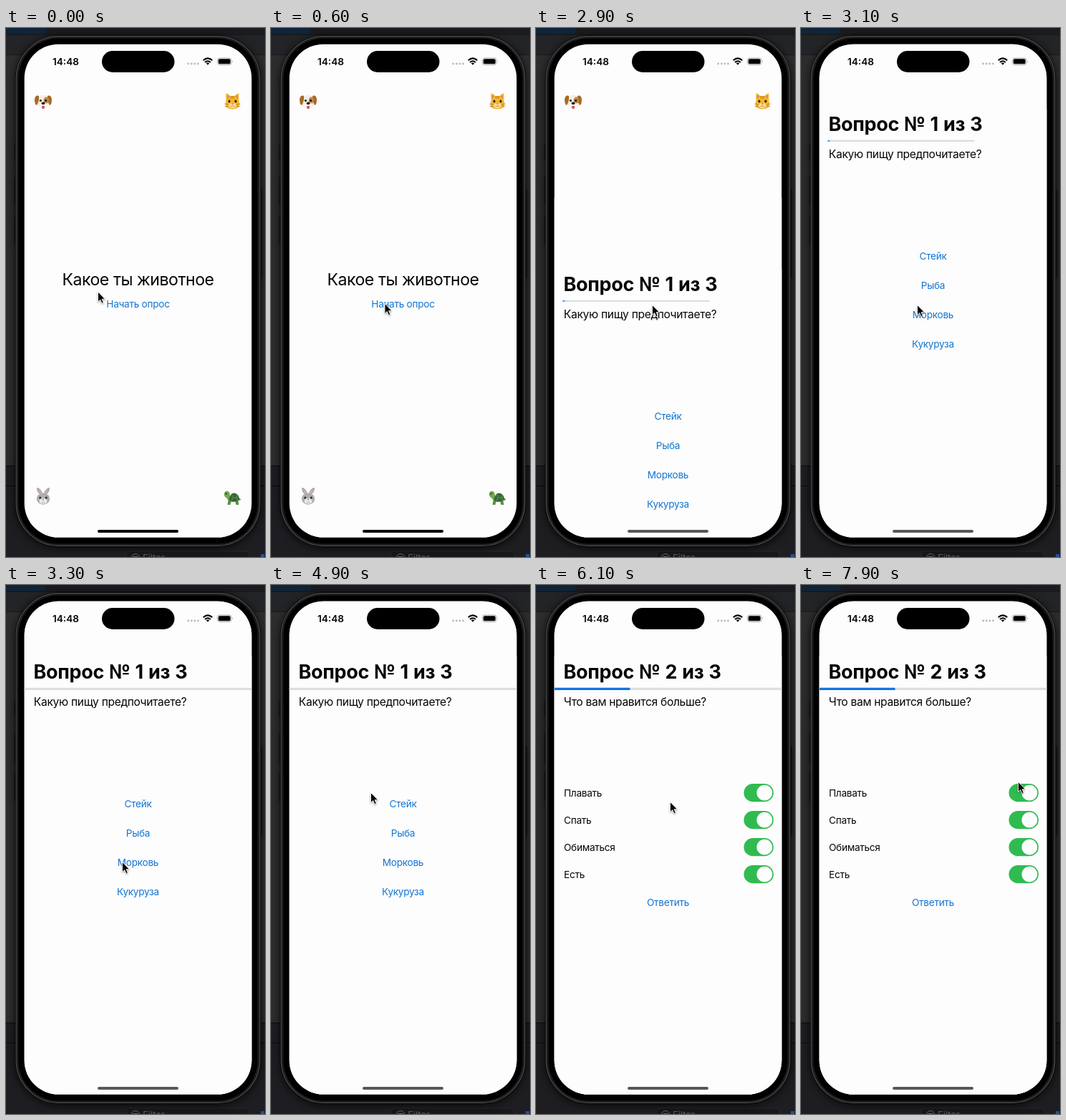
Write an HTML page that moves like this. It is 362 px wide and 740 px high and loops after 8 s.

```html
<!DOCTYPE html>
<html lang="ru">
<head>
<meta charset="utf-8">
<style>
html, body { margin: 0; width: 100%; height: 100%; overflow: hidden; background: #1e1e22; }
svg { display: block; width: 362px; height: 740px; }
text { font: 13.6px Inter, sans-serif; font-optical-sizing: none; letter-spacing: -.02em; fill: #050505; }
.mid { text-anchor: middle; }
.hero { font-size: 23.1px; }
.title { font-size: 27px; font-weight: 700; letter-spacing: -.012em; word-spacing: 1px; }
.sub { font-size: 15.6px; }
.link { fill: #1275d2; }
.time { font-weight: 600; letter-spacing: 0; }
.phone { filter: drop-shadow(0 2px 6px #000b); }
.cursor { filter: drop-shadow(0 1px 1px #0006); }
</style>
</head>
<body>
<svg viewBox="0 0 362 740">
  <defs>
    <clipPath id="screen"><rect x="25.7" y="22.7" width="317.6" height="689.8" rx="47.5"/></clipPath>
  </defs>

  <!-- desktop -->
  <rect width="362" height="740" fill="#2d2d2e"/>
  <rect width="362" height="38" fill="#232427"/>
  <rect width="362" height="9" fill="#1b1c1f"/>
  <rect width="55" height="8" fill="#10253a"/>
  <path d="M0 9.5H362M0 37.5H362" stroke="#18191b"/>
  <rect y="612" width="362" height="128" fill="#1e1e22"/>
  <path d="M0 612.5H362M0 640.5H362" stroke="#0b0b0d"/>
  <rect x="168" y="732" width="172" height="20" rx="5" fill="#18181b" stroke="#28292c"/>
  <g fill="none" stroke="#68696c"><circle cx="181" cy="741" r="5.5"/><path d="M178 739.5H184"/></g>
  <text x="191" y="746" style="fill:#58595c">Filter</text>
  <rect x="356" y="736" width="5" height="4" fill="#2450a0"/>

  <!-- handset -->
  <g class="phone">
    <path d="M13 163V184M13 208V248M13 262V302M356.5 226V350" stroke="#101010" stroke-width="3"/>
    <rect x="12.8" y="10.3" width="343.4" height="715.4" rx="61" fill="#000"/>
  </g>
  <rect x="14.2" y="11.7" width="340.6" height="712.6" rx="59.5" fill="#1c1c1d" stroke="#4c4d4f" stroke-width="1.2"/>
  <rect x="17.3" y="14.500" width="334.4" height="707" rx="56.500" fill="#000"/>
  <rect x="25.7" y="22.7" width="317.6" height="689.8" rx="47.5" fill="#fdfdfd"/>

  <g clip-path="url(#screen)">
    <g id="home">
      <text class="mid hero" x="184.5" y="360">Какое ты животное</text>
      <text class="mid link" id="start" x="184.5" y="390.600">Начать опрос</text>

      <g transform="translate(52 103)">
        <ellipse rx="9.2" ry="9.3" fill="#f3eee6"/>
        <path d="M-6-8Q-11-10-12-3Q-12 4-9 5Q-7 2-6-3ZM6-8Q11-10 12-3Q12 4 9 5Q7 2 6-3Z" fill="#a86a28"/>
        <ellipse cx="4.3" cy="-2" rx="3.6" ry="4.6" fill="#c38945"/>
        <ellipse cy="5" rx="5.5" ry="4" fill="#fffaf3"/>
        <circle cx="-3.6" cy="-1.5" r="1.6" fill="#241810"/><circle cx="3.6" cy="-1.5" r="1.6" fill="#241810"/>
        <ellipse cy="2.4" rx="2.5" ry="1.8" fill="#1d1715"/>
        <path d="M-2 6H2V9Q0 11.5-2 9Z" fill="#d85b62"/>
      </g>

      <g transform="translate(316.5 103)">
        <path d="M-9-1L-9-11Q-8-13-3-8H3Q8-13 9-11L9-1Q13 10 0 10.5Q-13 10-9-1Z" fill="#f4b62f"/>
        <path d="M-7.5-4V-9.5L-4-7ZM7.5-4V-9.5L4-7Z" fill="#d98b58"/>
        <path d="M-2-8V-4M2-8V-4M0-8V-4" stroke="#c77d19"/>
        <ellipse cy="5.5" rx="5" ry="3.5" fill="#fbe3a1"/>
        <ellipse cx="-4.5" cy="-.5" rx="1.5" ry="1.9" fill="#2d2411"/><ellipse cx="4.5" cy="-.5" rx="1.5" ry="1.9" fill="#2d2411"/>
        <path d="M-1.6 2.5H1.6L0 4.5Z" fill="#b65b48"/>
        <path d="M-3 6Q-1 8 0 5.5Q1 8 3 6M-6 4L-11 3M-6 6L-11 7M6 4L11 3M6 6L11 7" fill="none" stroke="#9a6c25" stroke-width=".7"/>
      </g>

      <g transform="translate(52 655)">
        <path d="M-2-2Q-9-4-9-12Q-4-12-1-4H1Q4-12 9-12Q9-4 2-2Z" fill="#a3a3a8"/>
        <path d="M-4-4Q-7-7-7-10Q-4-8-2-4ZM4-4Q7-7 7-10Q4-8 2-4Z" fill="#d9b2b6"/>
        <ellipse cy="3.5" rx="9.2" ry="8" fill="#adadb1"/>
        <ellipse cy="7" rx="5.5" ry="4" fill="#ececee"/>
        <circle cx="-4.3" cy="2" r="1.5" fill="#272529"/><circle cx="4.3" cy="2" r="1.5" fill="#272529"/>
        <path d="M-1.8 4H1.8L0 6Z" fill="#cf7784"/>
        <path d="M-1.4 8H1.4V11H-1.4Z" fill="#fff" stroke="#77777c" stroke-width=".5"/>
      </g>

      <g transform="translate(316.5 657)">
        <path d="M-6 4L-7 10H-3L-2 6H4L5 10H9L8 3Q12 5 11.5 2L5-2Z" fill="#5c9342"/>
        <path d="M-5 5Q-8 0-11-2Q-13-6-9.5-9Q-5-10-4-6Q-4-2-1 1Z" fill="#73a84d"/>
        <path d="M-5 4Q-4-6 2-6.5Q9-6 10 3Q4 7-5 4Z" fill="#35693a"/>
        <path d="M-1-4L1 0L-2 5M1 0H6L8 4M6 0L7-4" fill="none" stroke="#69944c"/>
        <circle cx="-8.8" cy="-5.5" r="1" fill="#172012"/>
      </g>
    </g>

    <g id="modal">
      <rect x="25" width="320" height="740" fill="#fdfdfd"/>
      <g id="food">
        <text class="title" x="38.5" y="131">Вопрос № 1 из 3</text>
        <rect id="track" fill="#dcddde" rx="1"/>
        <rect id="dot" x="37" y="143.8" width="3.5" height="2.2" rx="1" fill="#5aa2ee"/>
        <text class="sub" x="38.8" y="168.5">Какую пищу предпочитаете?</text>
        <g id="answers"></g>
      </g>
      <g id="hobby">
        <rect x="25" y="100" width="320" height="640" fill="#fdfdfd"/>
        <text class="title" x="38.5" y="131">Вопрос № 2 из 3</text>
        <rect x="25" y="143.7" width="320" height="3.2" fill="#dcddde"/>
        <rect x="25" y="143.7" width="106.6" height="3.2" rx="1.2" fill="#1272e6"/>
        <text class="sub" x="38.8" y="168.5">Что вам нравится больше?</text>
        <g id="switches"></g>
        <text class="mid link" x="184.5" y="448.700">Ответить</text>
      </g>
    </g>

    <!-- system overlay -->
    <text class="time" x="65" y="51.8">14:48</text>
    <rect x="134" y="32" width="101.5" height="30" rx="15"/>
    <g fill="#b9b9bb"><circle cx="254.7" cy="50" r="1.4"/><circle cx="259.3" cy="50" r="1.4"/><circle cx="263.9" cy="50" r="1.4"/><circle cx="268.5" cy="50" r="1.4"/></g>
    <path d="M275.7 45.3Q282 39.5 288.3 45.3M278 48Q282 44.4 286 48" fill="none" stroke="#050505" stroke-width="2"/>
    <path d="M279.7 49.3Q282 47.5 284.3 49.3L282 51.7Z"/>
    <rect x="295.5" y="42" width="19.5" height="9.6" rx="3" fill="none" stroke="#a4a4a6" stroke-width=".9"/>
    <rect x="296.8" y="43.3" width="16.9" height="7" rx="1.9"/>
    <path d="M316.2 45.3Q318 46.8 316.2 48.3Z" fill="#a4a4a6"/>
    <rect id="indicator" x="128" y="702" width="113" height="4" rx="2"/>
  </g>

  <path id="cursor" class="cursor" d="M.5.5V14.5L3.7 11.6L6 16.7L8.3 15.7L6.1 10.7H10.5Z" stroke="#fff" stroke-width=".9"/>
</svg>

<script>
const el = id => document.getElementById(id);
const LOOP = 8000, STEP = 100, WIDTH = 318, HEIGHT = 690;

el('answers').innerHTML = ['Стейк', 'Рыба', 'Морковь', 'Кукуруза'].map((label, i) =>
  `<text class="mid link" x="184.5" y="${311.3 + i * 40.8}">${label}</text>`).join('');

el('switches').innerHTML = ['Плавать', 'Спать', 'Обиматься', 'Есть'].map((label, i) => `
  <g transform="translate(0 ${i * 38})">
    <text x="39" y="295.6">${label}</text>
    <rect x="290.5" y="278" width="41.5" height="25.3" rx="12.65" fill="#30bb51"/>
    <circle cx="319.4" cy="290.65" r="10.9" fill="#fdfdfd"/>
  </g>`).join('');

// time, x, y of the pointer tip
const pointer = [
  [0, 128, 368.5], [400, 158.5, 385], [2400, 158.5, 385], [2900, 162, 387],
  [3700, 162, 387], [4000, 121.5, 289], [4600, 121.5, 289], [4900, 139, 290],
  [5500, 187, 303], [7400, 187, 303], [7900, 303, 275], [LOOP, 303, 275]
];

function pointerAt(t) {
  const i = pointer.findIndex(key => key[0] > t);
  const [t0, x0, y0] = pointer[i - 1], [t1, x1, y1] = pointer[i];
  const k = (t - t0) / (t1 - t0);
  return [x0 + (x1 - x0) * k, y0 + (y1 - y0) * k];
}

// Critically damped spring: distance left, from 1 to 0
function remaining(t, start) {
  const s = Math.max(0, t - start) / 1000 * 18.26;
  return (1 + s) * Math.exp(-s);
}

const move = (id, x, y) => el(id).setAttribute('transform', `translate(${x} ${y})`);

function setTrack(x, y, width, height) {
  Object.entries({ x, y, width, height }).forEach(([name, value]) => el('track').setAttribute(name, value));
}

function draw(t) {
  const rise = remaining(t, 2777), push = remaining(t, 5660);
  const compact = t < 3200;
  move('cursor', ...pointerAt(t));
  move('modal', 0, t < 3300 ? HEIGHT * rise : 0);
  move('food', -.3 * WIDTH * (1 - push), 0);
  move('hobby', t < 6100 ? WIDTH * push : 0, 0);
  el('food').setAttribute('visibility', t < 6100 ? 'visible' : 'hidden');
  el('start').setAttribute('opacity', t >= 2600 && t < 2800 ? .35 : 1);
  el('dot').setAttribute('opacity', compact ? 1 : 0);
  if (compact) setTrack(37, 143.8, 205.5, 2.2);
  else setTrack(25, 143.7, 320, 3.2);
  el('indicator').setAttribute('fill', t < 2800 ? '#000' : '#58585a');
}

function tick() {
  draw(Math.floor(performance.now() % LOOP / STEP) * STEP);
  requestAnimationFrame(tick);
}
tick();
</script>
</body>
</html>
```
